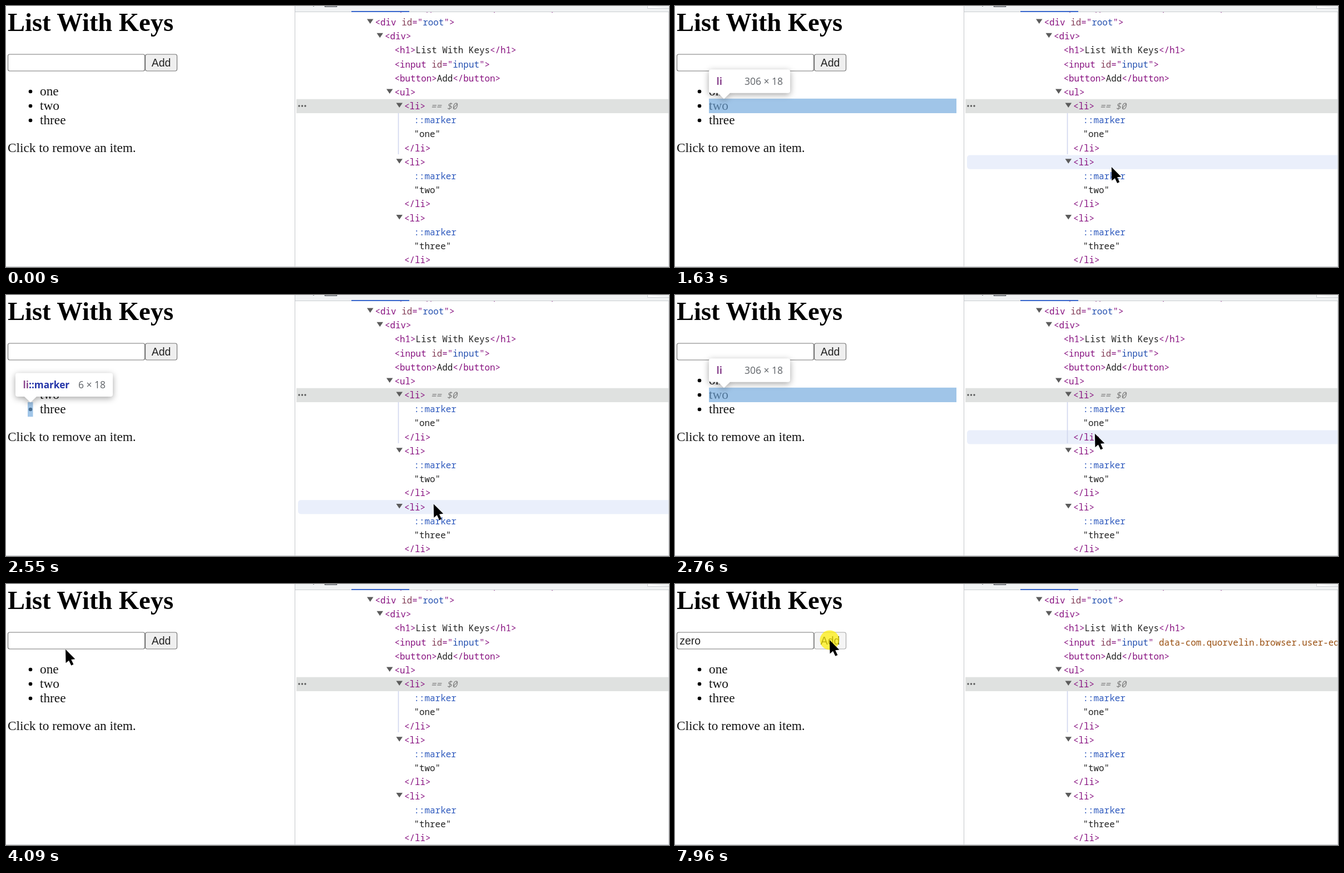
Animation, 1192 px wide and 470 px high, one loop 8000 ms. Source, as an HTML page:

```html
<!DOCTYPE html>
<html lang="en">
<head>
<meta charset="utf-8">
<title>List With Keys</title>
<style>
  html, body { margin: 0; width: 100%; height: 100%; overflow: hidden; background: #fff; }
  svg { display: block; width: 100%; height: 100%; }
  text { white-space: pre; }
  .serif { font: 23.27px "Liberation Serif", serif; fill: #141414; }
  .title { font: bold 46.5px "Liberation Serif", serif; }
  .ui { font: 19.39px "Liberation Sans", sans-serif; fill: #222; }
  .code { font: 15.88px "Noto Sans Mono", monospace; fill: #222; }
  .tip { font: 17.45px "Open Sans", sans-serif; fill: #5f6368; }
  .tip .name { font-size: 17.2px; font-weight: 700; }
  .tag { fill: #881280; }
  .attr { fill: #85405a; }
  .extra { fill: #994f10; }
  .value { fill: #2450b0; }
  .pseudo { fill: #2c58bd; }
  .note { fill: #7c7c7c; font-style: italic; }
  #tooltip { filter: drop-shadow(0 3px 5.8px rgba(0, 0, 0, .35)); }
</style>
</head>
<body>
<svg viewBox="0 0 1192 470">
  <rect width="1192" height="470" fill="#fff"/>

  <g id="page">
    <text class="title" x="3" y="45.4">List With Keys</text>
    <rect id="field" x="3.5" y="87" width="246" height="30" rx="3" fill="#fff"/>
    <text id="typed" class="ui" x="8.3" y="108.6"></text>
    <rect id="caret" y="91" width="1.6" height="21"/>
    <rect id="button" x="250.5" y="87" width="57" height="30" rx="3.5" stroke-width="1.2"/>
    <text class="ui" x="279" y="108.6" text-anchor="middle">Add</text>
    <g id="items"></g>
    <text class="serif" x="3" y="263">Click to remove an item.</text>
  </g>

  <g id="panel">
    <rect x="520" width="672" height="10" fill="#f1f3f4"/>
    <path d="M520 10.5H1192" stroke="#cacdd1"/>
    <rect x="621" y="9" width="104" height="2" fill="#3866cc"/>
    <path d="M573.5 0V1.2H594.5V0" fill="none" stroke="#5f6368" stroke-width="1.5"/>
    <rect x="552" width="2" height="1" fill="#80868b"/>
    <path d="M1153.5 0V4.5H1192" fill="#fff" stroke="#cacdd1"/>
    <path d="M709 11.5h2M756 11.5h2M763 11.5h2M877 11.5h2M981 11.5h2" stroke="#b070ac"/>
    <rect x="522" y="167.7" width="670" height="25.3" fill="#dfe1e0"/>
    <rect id="hover" x="525" width="672" height="25.2" rx="5" fill="#eaeffb"/>
    <g fill="#5a5a5a">
      <circle cx="527" cy="180" r="1.7"/><circle cx="532.5" cy="180" r="1.7"/><circle cx="538" cy="180" r="1.7"/>
    </g>
    <path d="M705.5 193V267" stroke="#d0d6ee" stroke-width="1.6"/>
    <g id="rows"></g>
  </g>

  <path d="M519.5 0V470M0 469.5H1192" stroke="#c4c6ca"/>
  <path d="M1191.5 11V470" stroke="#d4d6da"/>

  <g id="overlay">
    <rect id="shade" height="26.2" fill="#6fa8dc" fill-opacity=".66"/>
    <g id="tooltip">
      <path id="bubble" fill="#fff"/>
      <text class="tip" y="28"><tspan id="tipTag" class="name" fill="#8c4890"></tspan><tspan id="tipPseudo" class="name" fill="#2233a8"></tspan></text>
      <text id="tipSize" class="tip" y="28" text-anchor="end"></text>
    </g>
  </g>

  <circle id="press" r="17.5" fill="#ffee00" fill-opacity=".7"/>
  <path id="arrow" d="M0 0L.5 24.5L6 19.8L10.3 28.8L14.4 27L10.2 18.2L17.3 17.4Z"/>
  <path id="beam" d="M-5 -10.5H-1.5L0 -9L1.5 -10.5H5M0 -10V11M-5 11.5H-1.5L0 10L1.5 11.5H5" fill="none" stroke="#000" stroke-width="2.6"/>
</svg>

<script>
const LOOP = 8000;
const ROW = 25.18, ROW_TOP = 17;      // element tree line pitch and first line's top
const ITEM = 26.2, ITEM_TOP = 140.6;  // list line pitch and first line's top
const TIP_LAG = 70;                   // page highlight trails the pointer
const words = ["one", "two", "three"];
const $ = id => document.getElementById(id);

// pointer path: time, x, y
const path = [
  [70, 340, 450], [140, 358, 400], [200, 395, 335], [270, 409, 310], [560, 409, 310],
  [680, 465, 290], [760, 570, 250], [850, 720, 212], [930, 791, 201], [1400, 789, 215],
  [1560, 786, 270], [1680, 784, 304], [1780, 783, 312], [1930, 781, 396], [2090, 781, 408],
  [2220, 775, 436], [2290, 775, 441], [2390, 775, 441], [2500, 772, 410], [2690, 760, 285],
  [2760, 755, 250], [2860, 745, 215], [2950, 720, 207], [3050, 640, 205], [3220, 449, 204],
  [3350, 416, 204], [3580, 416, 204], [3700, 330, 260], [3800, 240, 263], [3900, 170, 220],
  [4000, 125, 150], [4090, 107, 118], [4180, 107, 105], [4300, 107, 101], [7110, 107, 101],
  [7250, 180, 103], [7350, 245, 102], [7490, 278, 101]
];

const keys = [[5510, "z"], [5900, "ze"], [6100, "zer"], [6300, "zero"]];
const caretSpans = [[4700, 5240], [5510, 6830], [7360, 7960]];
const ATTR_AT = 5640, FOCUS_AT = 4700, BLUR_AT = 7960;
const presses = [[4630, 4910], [7890, LOOP]];

const within = (t, spans) => spans.some(([a, b]) => t >= a && t < b);
const show = (el, on) => { el.style.display = on ? "" : "none"; };
const set = (el, attrs) => { for (const k in attrs) el.setAttribute(k, attrs[k]); };

// ---- static content ----
const esc = s => s.replace(/</g, "&lt;").replace(/>/g, "&gt;");
const span = (cls, s, id) => `<tspan class="${cls}"${id ? ` id="${id}"` : ""}>${esc(s)}</tspan>`;
const tag = s => span("tag", s);
const withId = (name, id) =>
  tag(`<${name} `) + span("attr", "id") + tag('="') + span("value", id) + tag('"');

// indent, has a fold triangle, markup
const rows = [
  [0, 1, withId("div", "root") + tag(">")],
  [1, 1, tag("<div>")],
  [2, 0, tag("<h1>") + "List With Keys" + tag("</h1>")],
  [2, 0, withId("input", "input") + span("tag", ">", "inputEnd") +
         span("extra", " data-com.quorvelin.browser.user-ed", "inputExtra")],
  [2, 0, tag("<button>") + "Add" + tag("</button>")],
  [2, 1, tag("<ul>")]
];
words.forEach((word, i) => rows.push(
  [3, 1, tag("<li>") + (i ? "" : span("note", " == $0"))],
  [4, 0, span("pseudo", "::marker")],
  [4, 0, `"${word}"`],
  [3, 0, tag("</li>")]
));

$("rows").innerHTML = rows.map(([indent, fold, markup], i) => {
  const x = 663.5 + indent * 17.5, y = 35 + i * ROW;
  const triangle = fold ? `<path d="M${x - 14.5} ${y - 11.5}h11.5l-5.75 8.5z" fill="#5c5c5c"/>` : "";
  return `${triangle}<text class="code" x="${x}" y="${y}">${markup}</text>`;
}).join("");

$("items").innerHTML = words.map((word, i) => {
  const y = 161 + i * 26;
  return `<circle cx="44" cy="${y - 7}" r="3.3"/><text class="serif" x="61" y="${y}">${word}</text>`;
}).join("");

// ---- moving parts ----
function pointerAt(t) {
  if (t < path[0][0]) return null;
  const i = path.findIndex(p => p[0] > t);
  if (i < 0) return path[path.length - 1].slice(1);
  const [t0, x0, y0] = path[i - 1], [t1, x1, y1] = path[i];
  const k = (t - t0) / (t1 - t0);
  return [x0 + (x1 - x0) * k, y0 + (y1 - y0) * k];
}

function rowAt(t) {
  const p = pointerAt(t);
  return p && p[0] > 522 ? Math.floor((p[1] - ROW_TOP) / ROW) : -1;
}

function drawOverlay(row) {
  show($("overlay"), row >= 6);
  if (row < 6) return;
  const item = Math.floor((row - 6) / 4), part = (row - 6) % 4;
  const top = ITEM_TOP + item * ITEM;
  let x = 61, width = 445, left = 61, tipWidth = 146, name = "li", pseudo = "", size = 306;
  if (part === 1) {
    x = 39; width = 9.5; left = 17; tipWidth = 175; pseudo = "::marker"; size = 6;
  } else if (part === 2) {
    width = [34, 35, 46.5][item];
    left = x + width / 2 - 27;
    name = "#text";
    size = Math.round(width / 1.4545);
  }
  set($("shade"), { x, y: top, width });
  set($("tooltip"), { transform: `translate(${left} ${top - 52.6})` });
  set($("bubble"), {
    d: `M4 0H${tipWidth - 4}q4 0 4 4V38.5q0 4 -4 4H38L27 53L16 42.5H4q-4 0 -4 -4V4q0 -4 4 -4z`
  });
  set($("tipTag"), { x: 13.5 });
  $("tipTag").textContent = name;
  $("tipPseudo").textContent = pseudo;
  set($("tipSize"), { x: tipWidth - 13 });
  $("tipSize").textContent = `${size} × 18`;
}

function drawForm(t, p) {
  const inForm = p && p[1] > 86 && p[1] < 117;
  const overField = inForm && p[0] > 3 && p[0] < 250;
  const overButton = inForm && p[0] >= 250 && p[0] < 308;
  const focused = t >= FOCUS_AT && t < BLUR_AT;
  const pressed = t >= BLUR_AT;

  set($("field"), {
    stroke: focused ? "#101010" : overField ? "#4f4f4f" : "#767676",
    "stroke-width": focused ? 2.9 : 1.2
  });
  set($("button"), {
    fill: pressed ? "#f5f5f5" : overButton ? "#e5e5e5" : "#efefef",
    stroke: pressed ? "#a8a8a8" : overButton ? "#4f4f4f" : "#767676"
  });

  const typed = keys.filter(k => t >= k[0]).pop();
  const text = $("typed");
  text.textContent = typed ? typed[1] : "";
  const end = typed ? text.getComputedTextLength() : 0;
  set($("caret"), { x: Math.max(9, 8.3 + end) });
  show($("caret"), within(t, caretSpans));
  show($("inputEnd"), t < ATTR_AT);
  show($("inputExtra"), t >= ATTR_AT);
  return overField;
}

function draw(t) {
  const p = pointerAt(t);
  const row = rowAt(t);
  show($("hover"), row > 6);
  set($("hover"), { y: ROW_TOP + row * ROW - .2 });
  drawOverlay(rowAt(t - TIP_LAG));

  const overField = drawForm(t, p);
  show($("arrow"), p && !overField);
  show($("beam"), overField);
  show($("press"), within(t, presses));
  if (!p) return;
  const [x, y] = p;
  set($("arrow"), { transform: `translate(${x} ${y})` });
  set($("beam"), { transform: `translate(${x + .5} ${y + .5})` });
  set($("press"), { cx: x, cy: y });
}

function frame() {
  draw(performance.now() % LOOP);
  requestAnimationFrame(frame);
}
frame();
</script>
</body>
</html>
```
